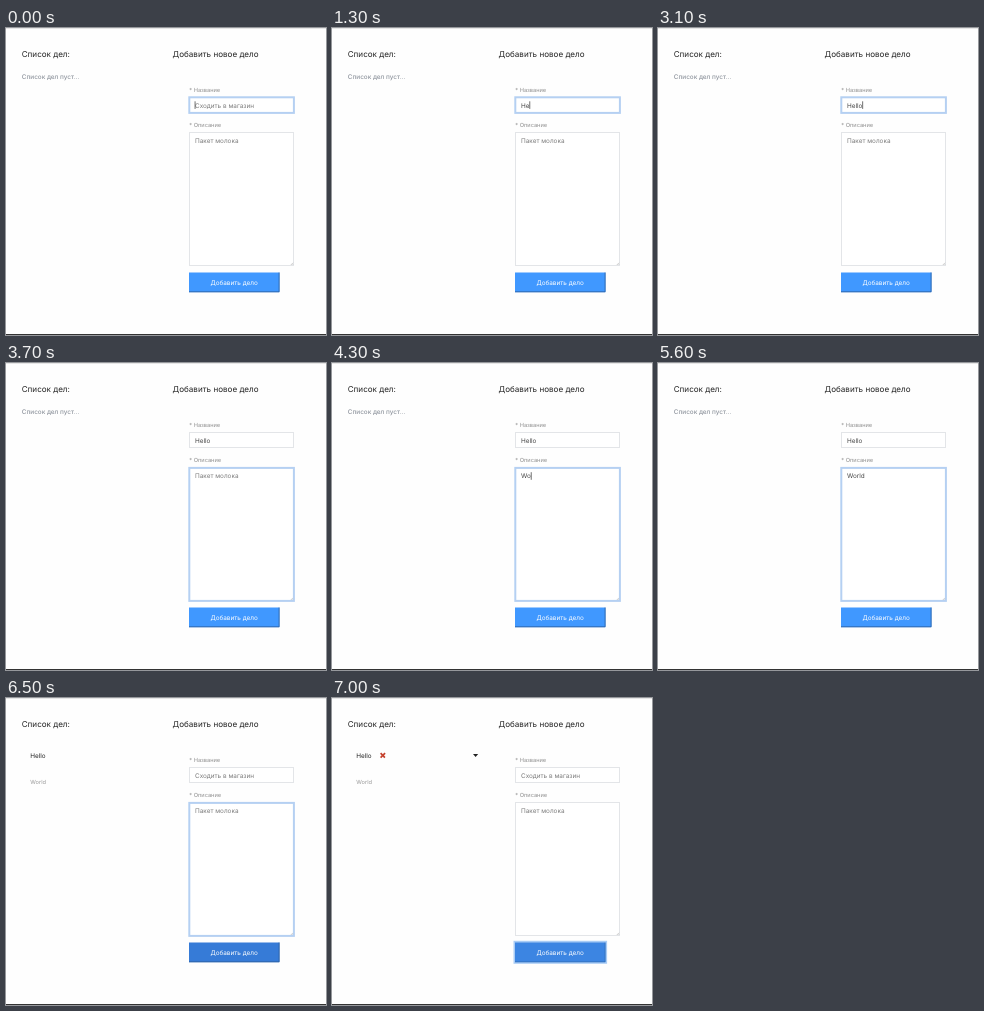
An HTML page for the animation above (8000 ms loop, 320 by 307 pixels).

```html
<!DOCTYPE html>
<html lang="ru">
<head>
<meta charset="utf-8">
<title>Список дел</title>
<style>
  html, body { margin: 0; width: 100%; height: 100%; overflow: hidden; background: #fefefe; }
  svg { display: block; width: 320px; height: 307px; }
  text { font: 6.4px Inter, "Open Sans", sans-serif; text-rendering: geometricPrecision; white-space: pre; }
  .heading { font-size: 8.1px; fill: #262626; }
  .label { font-size: 5.65px; fill: #8f8f8f; }
  .box { fill: #fff; stroke: #e3e5e8; }
  .ring { fill: none; stroke: #b5d0f2; stroke-width: 2; }
</style>
</head>
<body>
<svg viewBox="0 0 320 307">
  <rect width="320" height="307" fill="#fefefe"/>
  <rect width="320" height="1" fill="#e6e6e6"/>
  <rect y="306" width="320" height="1" fill="#333"/>

  <text class="heading" x="15.7" y="29.1">Список дел:</text>
  <text class="heading" x="166.5" y="29.1">Добавить новое дело</text>

  <text id="empty" x="15.8" y="51" fill="#8f959e" font-weight="500" style="font-weight:500">Список дел пуст...</text>
  <g id="item">
    <text x="24.2" y="59.6" fill="#222">Hello</text>
    <text x="24.3" y="86" class="label" style="fill:#999">World</text>
    <g id="controls">
      <path d="M48.6 55.1l4.3 4.5M53.1 55.1l-4.5 4.5" stroke="#c5412d" stroke-width="1.7"/>
      <path d="M141 56h5.2l-2.6 3z" fill="#222"/>
    </g>
  </g>

  <text class="label" x="183.3" y="64">* Название</text>
  <text class="label" x="183.3" y="99.2">* Описание</text>

  <rect class="box" x="183.5" y="69.5" width="104" height="15"/>
  <rect class="ring" id="titleRing" x="183.3" y="69.3" width="104.6" height="15.6"/>
  <text id="title" x="189" y="79.5"></text>

  <rect class="box" x="183.5" y="104.5" width="104" height="133"/>
  <path d="M284.8 237l2.2-2.2M286.3 237l.7-.7" stroke="#999" stroke-width=".5"/>
  <rect class="ring" id="bodyRing" x="183.3" y="104.9" width="104.6" height="133"/>
  <text id="body" x="189" y="115.3"></text>
  <rect id="caret" width=".7" height="7.6" fill="#333"/>

  <rect id="buttonRing" x="182.6" y="243.9" width="91.4" height="20.8" fill="none" stroke="#a9ccf5" stroke-width="2.2"/>
  <rect id="button" x="183" y="244.5" width="90.5" height="19.7"/>
  <path id="bevel" d="M183 263.8h90.1v-19.3" fill="none" stroke="#2c5f9e" stroke-width=".8"/>
  <text x="204.4" y="256.8" fill="#fff">Добавить дело</text>
</svg>
<script>
const LOOP = 8000, BLINK = 500;
const FOCUS_BODY = 3200, PRESS = 6400, SUBMIT = 6500, RELEASE = 6600, SETTLED = 6800;
const titleKeys = [[600, 'H'], [1300, 'He'], [1900, 'Hell'], [2100, 'Hello']];
const bodyKeys = [[3900, 'W'], [4300, 'Wo'], [4500, 'Wor'], [4800, 'Worl'], [5100, 'World']];

const $ = id => document.getElementById(id);
const show = (id, opacity) => $(id).setAttribute('opacity', +opacity);
const clamp = v => Math.max(0, Math.min(1, v));
const lastKey = (keys, t) => keys.filter(([at]) => at <= t).pop();

function setField(id, keys, placeholder, t) {
  const key = t < SUBMIT && lastKey(keys, t);
  const field = $(id);
  const value = key ? key[1] : placeholder;
  if (field.textContent !== value) field.textContent = value;
  field.setAttribute('fill', key ? '#454545' : '#7b7b7b');
  return key;
}

function setCaret(id, key, focusedAt, y, t) {
  const width = key ? $(id).getComputedTextLength() : -0.3;
  const since = t - (key ? key[0] : focusedAt);
  $('caret').setAttribute('x', 189 + width);
  $('caret').setAttribute('y', y);
  show('caret', t < SUBMIT && Math.floor(since / BLINK) % 2 === 0);
}

function draw(t) {
  const titleKey = setField('title', titleKeys, 'Сходить в магазин', t);
  const bodyKey = setField('body', bodyKeys, 'Пакет молока', t);
  const inTitle = t < FOCUS_BODY;
  if (inTitle) setCaret('title', titleKey, 0, 73.3, t);
  else setCaret('body', bodyKey, FOCUS_BODY, 109.2, t);

  const settle = clamp((Math.floor(t / 100) * 100 - SUBMIT) / (SETTLED - SUBMIT));
  show('titleRing', inTitle);
  show('bodyRing', inTitle ? 0 : 1 - settle);
  show('buttonRing', settle);
  show('empty', t < SUBMIT);
  show('item', t >= SUBMIT);
  show('controls', t >= RELEASE);

  const pressed = t >= PRESS && t < RELEASE;
  $('button').setAttribute('fill', pressed ? '#367bd7' : t < PRESS ? '#4098ff' : '#3c85e2');
  show('bevel', t < RELEASE ? 1 : 0.6);
}

function tick() {
  draw(performance.now() % LOOP);
  requestAnimationFrame(tick);
}
tick();
</script>
</body>
</html>
```
